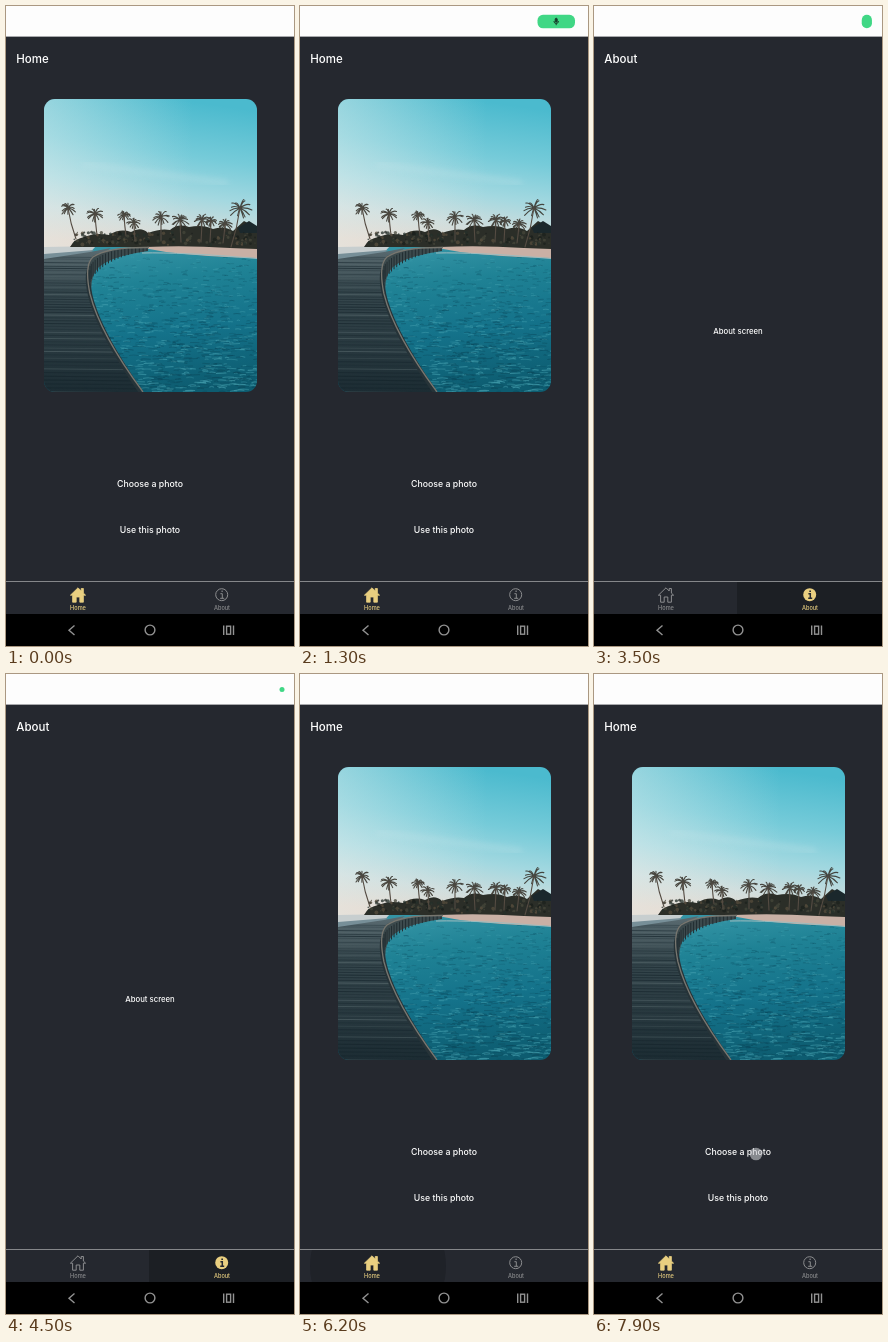
Recreate the animation shown at these times as an HTML page. Size 288 px wide and 640 px high, loop 8 s.

```html
<!DOCTYPE html>
<html lang="en">
<head>
<meta charset="utf-8">
<title>Photo app</title>
<style>
  html, body { margin: 0; width: 100%; height: 100%; overflow: hidden; background: #25282f; }
  svg { display: block; width: 288px; height: 640px; }
  text { font-family: Inter, sans-serif; font-weight: 500; fill: #fff; }
  .title { font-size: 11.5px; }
  .button { font-size: 8.75px; text-anchor: middle; }
  .body { font-size: 7.75px; text-anchor: middle; }
  .tab { font-size: 5.6px; text-anchor: middle; }
  .on { color: #e9cf80; }
  .off { color: #8b8c8e; }
  .tab.on, .tab.off { fill: currentColor; }
</style>
</head>
<body>
<svg viewBox="0 0 288 640">
  <defs>
    <linearGradient id="sky" x1=".6" x2=".4" y2="1">
      <stop offset="0" stop-color="#4bbace"/>
      <stop offset=".35" stop-color="#76cbd9"/>
      <stop offset=".6" stop-color="#a3d8e0"/>
      <stop offset=".8" stop-color="#cddcdc"/>
      <stop offset="1" stop-color="#e8d6ca"/>
    </linearGradient>
    <linearGradient id="haze">
      <stop offset="0" stop-color="#e2efee" stop-opacity=".45"/>
      <stop offset=".7" stop-color="#e2efee" stop-opacity="0"/>
    </linearGradient>
    <linearGradient id="sea" x1=".4" x2=".6" y2="1">
      <stop offset="0" stop-color="#3494a5"/>
      <stop offset=".25" stop-color="#1f8295"/>
      <stop offset=".6" stop-color="#14728a"/>
      <stop offset="1" stop-color="#0d5c70"/>
    </linearGradient>
    <linearGradient id="wood" x2="0" y2="1">
      <stop offset="0" stop-color="#5a6b71"/>
      <stop offset=".3" stop-color="#36474d"/>
      <stop offset="1" stop-color="#1c2c33"/>
    </linearGradient>
    <clipPath id="frame"><rect x="38" y="93" width="213" height="293" rx="11"/></clipPath>
    <clipPath id="deckClip"><path id="deck" d="M38 253 84 246 105 242 88 254Q76 268 88 303 99 338 135 386H38Z"/></clipPath>
    <clipPath id="tabs"><rect y="576" width="288" height="32"/></clipPath>
    <filter id="soft" x="-20%" width="140%"><feGaussianBlur stdDeviation="3"/></filter>
    <path id="house" d="M72 581.8 64.4 589.2H66.6V596.2H70.2V591H73.8V596.2H77.4V589.2H79.6L77.4 587.1V582.5H75.2V585Z" stroke-linejoin="round"/>
    <path id="info" d="M214.4 587.7H216.3V592.2M214.2 592.3H218.2M215.3 585.2H217" fill="none"/>
  </defs>

  <rect width="288" height="640" fill="#25282f"/>
  <rect width="288" height="30.6" fill="#fdfdfd"/>
  <g clip-path="url(#tabs)">
    <rect id="aboutRipple" x="143" y="570" height="44" fill="#15171a"/>
    <rect id="homePress" x="1" y="570" width="53" height="44" fill="#15171a" filter="url(#soft)"/>
    <circle id="homeRipple" cx="78" cy="592" r="68" fill="#1d2025"/>
  </g>
  <path d="M0 575.5H288" stroke="#85878a"/>

  <g id="home">
    <text class="title" x="10.3" y="57">Home</text>
    <g clip-path="url(#frame)">
      <rect x="38" y="93" width="213" height="150" fill="url(#sky)"/>
      <rect x="38" y="93" width="213" height="150" fill="url(#haze)"/>
      <path d="M76 158Q135 166 222 177" fill="none" stroke="#c6e5e9" stroke-width="3" opacity=".55" filter="url(#soft)"/>
      <rect x="38" y="241" width="213" height="145" fill="url(#sea)"/>
      <path d="M38 241 90 240 80 251 38 252Z" fill="#c7cecf"/>
      <path d="M38 248 88 244 80 251 38 254Z" fill="#778f98"/>
      <g id="waves" fill="none" stroke-linecap="round"/>
      <path d="M132 241Q190 237 251 242V252Q200 251 160 246Z" fill="#c9b0a5"/>
      <path d="M136 247Q175 246 251 252.5" fill="none" stroke="#9dbcbf"/>
      <path d="M64 241Q68 233 78 231 90 226 103 229 114 222 125 226 135 220 142 227 155 222 164 224 172 217 183 221 197 218 207 223 218 219 227 225L238 215 251 222V243L224 242Q180 239 140 241Z" fill="#2b2e28"/>
      <path d="M232 222 243 215 251 220V227H234Z" fill="#1b282c"/>
      <g id="shrubs"/>
      <g id="palms" fill="none" stroke="#3a372f" stroke-linecap="round"/>
      <use href="#deck" fill="url(#wood)"/>
      <g id="planks" clip-path="url(#deckClip)"/>
      <path d="M142 241Q102 242 87 250 79 256 83 290L86 292Q83 270 93 261 106 250 142 245Z" fill="#3c4a4d"/>
      <g id="posts" stroke="#232e32" stroke-width="1"/>
      <path d="M83 264Q80 275 86 296 97 332 135 386" fill="none" stroke="#263338" stroke-width="4.5"/>
      <path d="M143 241.5Q101 241 87 251 78 259 84 288 94 328 137 386" fill="none" stroke="#77766f" stroke-width="1.3"/>
    </g>
    <text class="button" x="144" y="481">Choose a photo</text>
    <text class="button" x="144" y="526.5">Use this photo</text>
    <g class="on"><use href="#house" fill="currentColor" stroke="currentColor" stroke-width=".8"/></g>
    <text class="tab on" x="72" y="604">Home</text>
    <g class="off" stroke="currentColor">
      <circle cx="215.7" cy="588.7" r="6" fill="none"/>
      <use href="#info"/>
    </g>
    <text class="tab off" x="216" y="604">About</text>
  </g>

  <g id="about">
    <text class="title" x="10.3" y="57">About</text>
    <text class="body" x="144" y="327.5">About screen</text>
    <g class="off"><use href="#house" fill="none" stroke="currentColor"/></g>
    <text class="tab off" x="72" y="604">Home</text>
    <g class="on">
      <circle cx="215.7" cy="588.7" r="6.5" fill="currentColor"/>
      <use href="#info" stroke="#25282f" stroke-width="1.5"/>
    </g>
    <text class="tab on" x="216" y="604">About</text>
  </g>

  <rect y="608" width="288" height="32"/>
  <g fill="none" stroke="#929292" stroke-width="1.4">
    <path d="M68.5 619.5 63 624.2 68.5 629M217.7 619.5V629M227.5 619.5V629"/>
    <circle cx="144" cy="624" r="4.9"/>
    <rect x="220.6" y="620.2" width="4" height="8"/>
  </g>

  <rect id="pill" fill="#40d785"/>
  <g id="mic" fill="none" stroke="#173d2b">
    <rect x="255.2" y="12.2" width="2" height="4" rx="1" fill="#173d2b"/>
    <path d="M253.9 15Q254 17.5 256.2 17.5T258.5 15M256.2 17.5V19.2"/>
  </g>
  <circle id="touch" r="6.3" fill="#c9ccd0"/>
</svg>

<script>
const $ = id => document.getElementById(id);
let seed = 7;
const random = () => (seed = seed * 16807 % 2147483647) / 2147483647;
const between = (a, b) => a + (b - a) * random();

function add(parent, tag, attributes) {
  const node = document.createElementNS('http://www.w3.org/2000/svg', tag);
  set(node, attributes);
  $(parent).append(node);
}
function set(node, attributes) {
  for (const name in attributes) node.setAttribute(name, attributes[name]);
}

function palm(x, y, baseX, baseY, size) {
  let d = '';
  for (let i = 0; i < 13; i++) {
    const angle = i / 13 * Math.PI * 2 + between(-.25, .25), reach = size * between(.75, 1.1);
    const dx = Math.cos(angle) * reach, dy = Math.sin(angle) * reach * .85;
    d += `M${x} ${y}q${dx * .6} ${dy * .7 - 1.5} ${dx} ${dy + 1}`;
  }
  add('palms', 'path', { d, 'stroke-width': 1.1, opacity: .9 });
  add('palms', 'path', { d: `M${x} ${y}Q${x + (baseX - x) * .3} ${(y + baseY) / 2} ${baseX} ${baseY}`, 'stroke-width': 1.1, stroke: '#544b42' });
}

function buildPhoto() {
  for (let i = 0; i < 1100; i++) {
    const depth = random() ** .8, y = 247 + depth * 139, x = between(80, 251);
    const length = between(2, 4 + depth * 8), lift = between(0, .5 + depth);
    add('waves', 'path', {
      d: `M${x} ${y}q${length / 2} ${-lift} ${length} ${between(-.5, .5)}`,
      stroke: random() < .42 ? '#4ba7b5' : '#0a485b',
      'stroke-width': .5 + depth * .7, opacity: between(.25, .6)
    });
  }
  for (let i = 0; i < 160; i++) add('shrubs', 'circle', {
    cx: between(68, 251), cy: between(226, 239), r: between(.6, 2),
    fill: ['#1b201c', '#45463a', '#564d3d', '#252f2a'][i % 4], opacity: .75
  });
  [[62, 202, 70, 233, 8], [89, 208, 91, 229, 8], [118, 209, 120, 230, 6], [128, 217, 129, 235, 7],
   [155, 211, 155, 235, 9], [174, 214, 175, 236, 9], [196, 214, 195, 236, 8], [205, 215, 204, 236, 6],
   [219, 218, 217, 237, 7], [234, 202, 225, 241, 11]].forEach(p => palm(...p));
  for (let y = 251; y < 387; y += 1.8 + (y - 251) / 60) add('planks', 'path', {
    d: `M38 ${y}L138 ${y + 1}`, stroke: random() < .65 ? '#15242b' : '#56676b',
    'stroke-width': between(.5, 1.1), opacity: between(.3, .7)
  });
  for (let i = 0; i < 20; i++) {
    const u = i / 19, x = 84 + 57 * u ** 1.3, y = 241 + 19 * (1 - u) ** 2.3;
    add('posts', 'path', { d: `M${x} ${y}v${4 + 12 * (1 - u)}` });
  }
}

const clamp = v => Math.max(0, Math.min(1, v));
const ramp = (t, from, to) => {
  const u = clamp((t - from) / (to - from));
  return u * u * (3 - 2 * u);
};
const mix = (a, b, u) => a + (b - a) * u;
const during = (t, from, to) => t >= from && t < to;

const touches = [
  { from: 1600, to: 2300, x: 221, y: 595, opacity: .25 },
  { from: 5400, to: 5800, x: 71, y: 592, opacity: .6 },
  { from: 7800, to: 8000, x: 162, y: 480, opacity: .6 }
];

function draw(t) {
  const onAbout = during(t, 1800, 5700);
  $('home').style.display = onAbout ? 'none' : '';
  $('about').style.display = onAbout ? '' : 'none';

  const spread = ramp(t, 2300, 3000);
  set($('aboutRipple'), {
    width: t < 2300 ? mix(75, 112, ramp(t, 1600, 1900)) : mix(112, 145, spread),
    opacity: during(t, 1600, 5100) ? mix(.7, .5, spread) : 0
  });
  $('homePress').style.opacity = during(t, 5400, 5900) ? .7 : 0;
  $('homeRipple').style.opacity = during(t, 5900, 7600) ? .65 : 0;

  const grow = ramp(t, 150, 550), shrink = ramp(t, 3150, 3620), settle = ramp(t, 3500, 3800);
  const left = mix(mix(275, 237.5, grow), 273.5, shrink), right = mix(275, 278.5, shrink);
  const height = mix(13.5, 5, settle);
  set($('pill'), {
    x: left, y: 15.6 - height / 2, width: right - left, height,
    rx: Math.min(5.5, (right - left) / 2), opacity: during(t, 150, 4800) ? 1 : 0
  });
  $('mic').style.opacity = ramp(t, 400, 600) * (1 - ramp(t, 3100, 3300));

  const touch = touches.find(p => during(t, p.from, p.to));
  set($('touch'), touch ? { cx: touch.x, cy: touch.y, opacity: touch.opacity } : { opacity: 0 });
}

buildPhoto();
const start = performance.now();
function tick() {
  draw((performance.now() - start) % 8000);
  requestAnimationFrame(tick);
}
tick();
</script>
</body>
</html>
```
